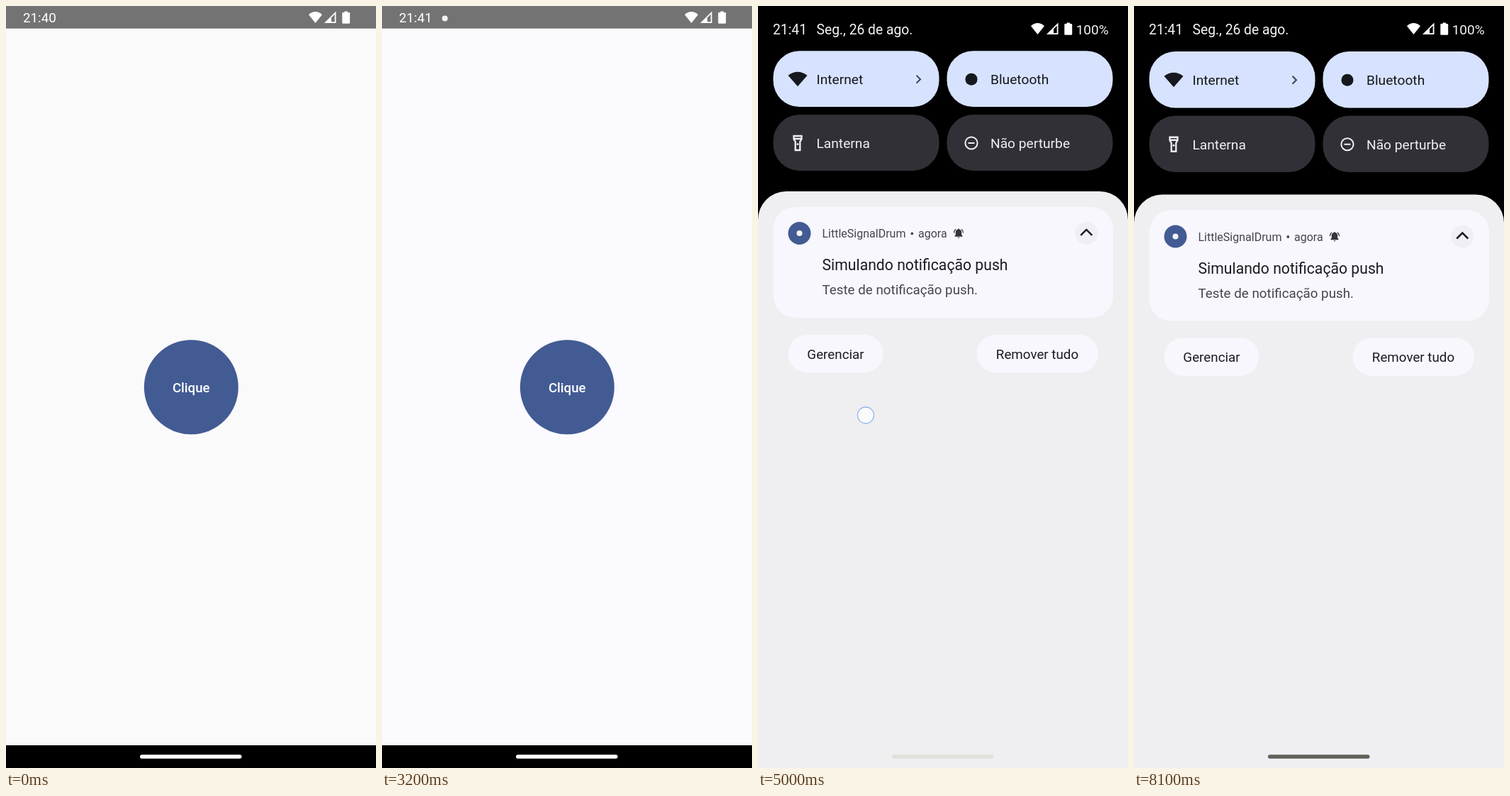
These frames come from a looping animation (522x1073 px, 8.2 s). An HTML page:

```html
<!DOCTYPE html>
<html lang="pt">
<head>
<meta charset="utf-8">
<style>
html, body { margin: 0; width: 100%; height: 100%; overflow: hidden; background: #000; }
svg { display: block; width: 100vw; height: 100vh; font-family: Roboto, sans-serif; }
text { white-space: pre; }
.line { fill: none; stroke: currentColor; stroke-width: 2; }
</style>
</head>
<body>
<svg viewBox="0 0 522 1073">
  <defs>
    <clipPath id="clip"><path id="clipShape"/></clipPath>
    <g id="status" fill="#fff">
      <path d="M427 12.2Q436.500 4 446 12.200L436.500 24Z"/>
      <path fill-rule="evenodd" d="M449 24L465.500 7.500V24ZM459 16.500V22.300H463.700V11.800Z"/>
      <path d="M477.500 7.500H482V9H484Q485.200 9 485.200 10.200V23.600Q485.200 24.800 484 24.800H475.500Q474.300 24.800 474.300 23.600V10.200Q474.300 9 475.500 9H477.500Z"/>
    </g>
  </defs>

  <g id="app">
    <rect id="page" x="-40" y="-40" width="602" height="1160"/>
    <rect x="-40" y="1041" width="602" height="100" fill="#000"/>
    <g id="button">
      <circle cx="261.300" cy="536.700" r="66.500" fill="#435b93"/>
      <text x="261.200" y="544" font-size="18.600" font-weight="500" fill="#fff" text-anchor="middle">Clique</text>
    </g>
  </g>

  <g id="bar">
    <rect width="522" height="31.700" fill="#737373"/>
    <text id="clock" x="24" y="23" font-size="18.800" fill="#fff"></text>
    <circle id="alertDot" cx="88.700" cy="17.500" r="4" fill="#f4f4f4"/>
    <use href="#status"/>
  </g>

  <rect id="panel" width="522" height="1073" fill="#efeef1"/>
  <path id="top" fill="#000"/>

  <g id="quick" clip-path="url(#clip)">
    <g id="header" fill="#f3f3f5" font-size="19.300">
      <text x="21" y="39.500">21:41</text>
      <text x="82.500" y="39.500">Seg., 26 de ago.</text>
      <use href="#status" x="-42" y="16"/>
      <text x="448.700" y="39.500" font-size="19">100%</text>
    </g>
    <g id="tiles" font-size="19.200"></g>
  </g>

  <g id="notes">
    <rect x="21.500" y="22" width="479.500" height="156" rx="31" fill="#f8f7fd"/>
    <circle cx="58.500" cy="59" r="16" fill="#435b93"/>
    <circle cx="58.500" cy="59" r="4" fill="#f4f4f8"/>
    <g font-size="16" fill="#45454e">
      <text x="90.500" y="65">LittleSignalDrum</text>
      <circle cx="217.300" cy="59.500" r="1.900"/>
      <text x="226" y="65">agora</text>
    </g>
    <g transform="translate(283 59.300)" color="#34343d">
      <path fill="currentColor" d="M-5.500 4.500V3.500L-4.200 2V-1.500Q-4.200 -5 -1 -5.800Q0 -8 1 -5.800Q4.200 -5 4.200 -1.500V2L5.500 3.500V4.500ZM-1.500 5.500H1.500Q0 8 -1.500 5.500Z"/>
      <path class="line" style="stroke-width:1.300" d="M-6.500 -0.800Q-6.300 -4.200 -4 -6M6.500 -0.800Q6.300 -4.200 4 -6"/>
    </g>
    <circle cx="463.300" cy="59" r="16" fill="#f0eff3"/>
    <path class="line" color="#1b1b22" style="stroke-width:2.500" d="M455.300 62L463.300 54L471.300 62"/>
    <text x="90.500" y="111" font-size="21.200" fill="#1b1b21">Simulando notificação push</text>
    <text x="90.500" y="145.500" font-size="18.800" fill="#46464e">Teste de notificação push.</text>
    <g font-size="18.800" text-anchor="middle">
      <rect x="42.500" y="201.800" width="134" height="53.500" rx="26.700" fill="#f8f7fd"/>
      <rect x="308.500" y="201.800" width="171.500" height="53.500" rx="26.700" fill="#f8f7fd"/>
      <text x="109.500" y="235.800" fill="#1b1b21">Gerenciar</text>
      <text x="394" y="235.800" fill="#1b1b21">Remover tudo</text>
    </g>
  </g>

  <rect id="pill" x="189" y="1054.300" width="143.500" height="5.500" rx="2.700"/>
  <circle id="touch" r="11.500" fill="#fff" fill-opacity=".75" stroke="#8db5ee" stroke-width="1.300"/>
</svg>

<script>
const LOOP = 8200;
const $ = id => document.getElementById(id);
const clamp = v => Math.max(0, Math.min(1, v));
const lerp = (a, b, u) => a + (b - a) * u;
const set = (el, attrs) => { for (const k in attrs) el.setAttribute(k, attrs[k]); };
const fade = (id, v) => $(id).setAttribute('opacity', v);
const tint = (id, rgb) => $(id).setAttribute('fill', `rgb(${rgb.map(Math.round)})`);

// Each key is [time, ...values].
function track(keys, t) {
  if (t <= keys[0][0]) return keys[0].slice(1);
  for (let i = 1; i < keys.length; i++) {
    const a = keys[i - 1], b = keys[i];
    if (t <= b[0]) {
      const u = (t - a[0]) / (b[0] - a[0]);
      return a.slice(1).map((v, j) => lerp(v, b[j + 1], u));
    }
  }
  return keys[keys.length - 1].slice(1);
}

// Dragging from PULL_Y to PULL_Y + PULL opens the shade fully.
const PULL_Y = 73, PULL = 512, OPEN_EDGE = 265.5;
const DRAG_START = 3600, RELEASE = 6250;
const drag = [
  [DRAG_START, 250, 10], [3900, 245, 22], [4100, 233, 75], [4300, 218, 179],
  [5000, 152, 576], [5500, 138, 700], [RELEASE, 135, 718]
];
const pageColor = [[0, 250, 250, 250], [900, 251, 250, 254]];
const pillColor = [
  [4300, 255, 255, 255], [5000, 225, 225, 219],
  [5900, 122, 122, 125], [6300, 122, 122, 125], [7000, 96, 96, 89]
];
const press = [[1900, 1], [2050, .5], [2150, .5], [2400, 1]];

const icons = {
  wifi: '<path fill="currentColor" d="M-13.500 -5.500Q0 -15.500 13.500 -5.500L0 10Z"/>',
  dot: '<circle r="8.500" fill="currentColor"/>',
  torch: '<path class="line" style="stroke-width:2.300" d="M-5.500 -10H5.500V-5.500L3.300 -2V10H-3.300V-2L-5.500 -5.500ZM-5.500 -6H5.500"/><circle cy="1.500" r="1.500" fill="currentColor"/>',
  quiet: '<circle class="line" r="8.600"/><path class="line" d="M-4.500 0H4.500"/>'
};
const tiles = [
  ['Internet', 'wifi', 0, 0], ['Bluetooth', 'dot', 1, 0],
  ['Lanterna', 'torch', 0, 1], ['Não perturbe', 'quiet', 1, 1]
].map(([label, icon, col, row]) => {
  const g = document.createElementNS('http://www.w3.org/2000/svg', 'g');
  const x = 21.5 + col * 245;
  const arrow = icon === 'wifi' ? '<path class="line" d="M223.500 -5.500L229 0L223.500 5.500" opacity=".8"/>' : '';
  g.innerHTML = `<rect x="${x}" width="234" fill="${row ? '#303036' : '#d7e2ff'}"/>
    <g color="${row ? '#f0f0f3' : '#16181f'}">
      <g transform="translate(${56 + col * 245})">${icons[icon]}</g>
      <text x="${82.5 + col * 245.5}" y="7" fill="currentColor">${label}</text>${arrow}
    </g>`;
  $('tiles').append(g);
  return { row, box: g.children[0], face: g.children[1] };
});

function placeTiles(open) {
  const top = lerp(17, 64, open), h = lerp(42, 79.5, open);
  for (const { row, box, face } of tiles) {
    const y = top + row * (h + 11);
    set(box, { y, height: h, rx: Math.min(37, h / 2) });
    face.setAttribute('transform', `translate(0 ${y + h / 2 + .5})`);
  }
}

function placeTouch(t, x, y) {
  const tap = t >= 1900 && t < 2100;
  const dragging = t >= DRAG_START && t < RELEASE;
  set($('touch'), {
    cx: tap ? 253 : x, cy: tap ? 566 : y,
    visibility: tap || dragging ? 'visible' : 'hidden'
  });
}

function draw(t) {
  const [x, y] = track(drag, t);
  const pull = Math.max(0, y - PULL_Y);
  const open = clamp(pull / PULL);
  const back = (1 + Math.cos(Math.PI * clamp((t - RELEASE) / 450))) / 2;
  const edge = OPEN_EDGE * open + Math.max(0, pull - PULL) * .195 * back;
  const r = Math.min(40, edge);
  const veil = clamp(open * 2.7);

  $('clock').textContent = t < 500 ? '21:40' : '21:41';
  tint('page', track(pageColor, t));
  fade('alertDot', clamp((t - 2150) / 150));
  fade('button', track(press, t)[0]);
  fade('bar', 1 - clamp(open * 8));
  $('app').style.filter = open > 0 && veil < 1 ? `blur(${4 * clamp(open * 5)}px)` : 'none';

  const shape = `M0 0H522V${edge + r}A${r} ${r} 0 0 0 ${522 - r} ${edge}H${r}A${r} ${r} 0 0 0 0 ${edge + r}Z`;
  $('clipShape').setAttribute('d', shape);
  set($('top'), { d: shape, opacity: clamp(open * 8) });
  fade('panel', veil);
  fade('quick', clamp(open * 6));
  fade('header', clamp((open - .5) / .4));
  placeTiles(open);

  set($('notes'), { transform: `translate(0 ${edge})`, opacity: clamp((open - .35) / .4) });
  tint('pill', track(pillColor, t));
  placeTouch(t, x, y);
}

const start = performance.now();
function tick() {
  draw((performance.now() - start) % LOOP);
  requestAnimationFrame(tick);
}
tick();
</script>
</body>
</html>
```
